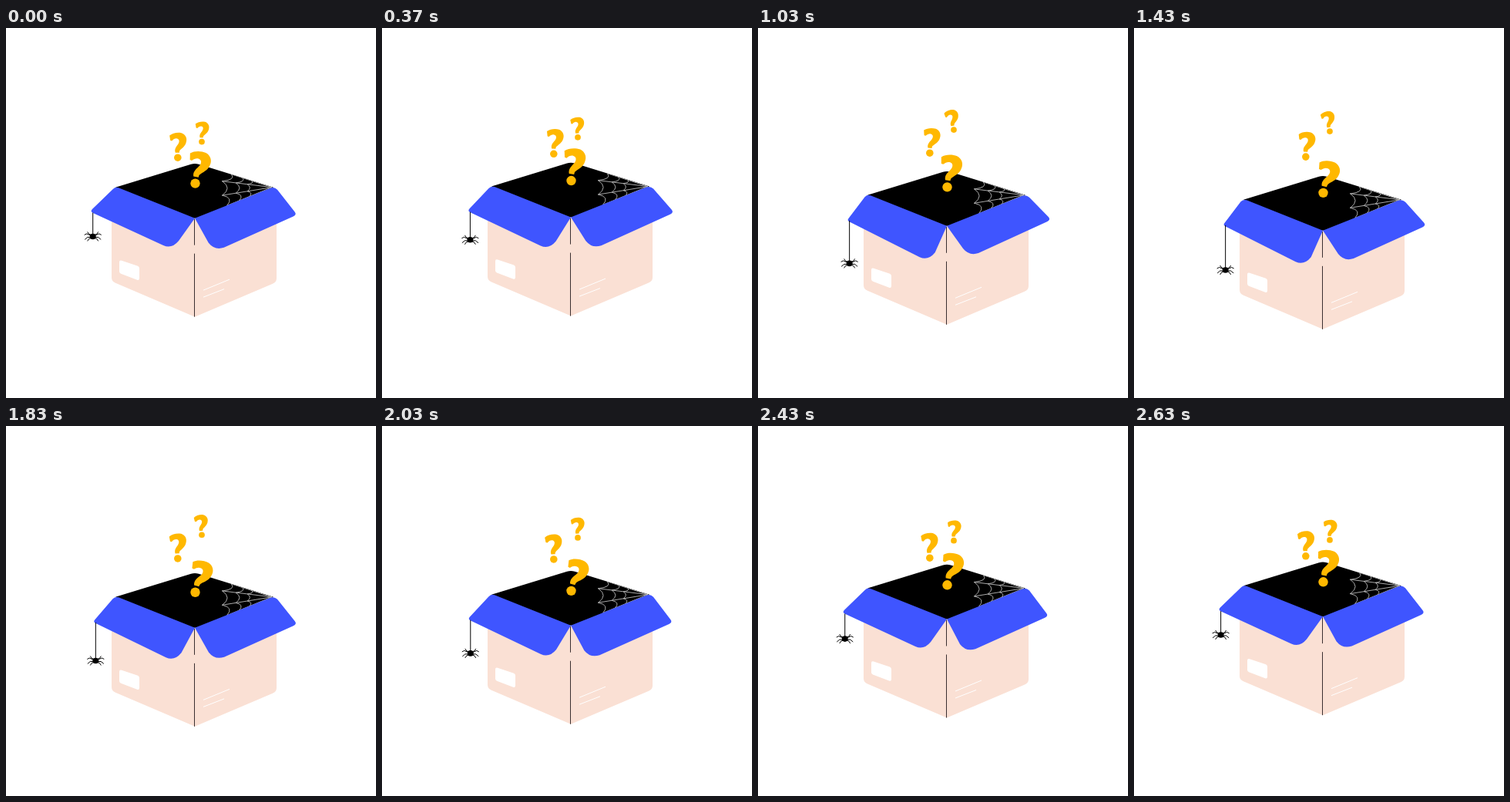
An HTML page with a canvas that plays this animation: 480x480 px, repeating every 2.67 s.

```html
<!DOCTYPE html>
<html lang="en">
<head>
<meta charset="utf-8">
<title>Empty box</title>
<style>
html, body { margin: 0; width: 100%; height: 100%; overflow: hidden; background: #fff; }
canvas { display: block; width: 100vmin; height: 100vmin; }
</style>
</head>
<body>
<canvas id="stage" width="480" height="480"></canvas>
<script>
const ctx = document.getElementById('stage').getContext('2d');
const LOOP = 2670;
const BLUE = '#3f55ff', SKIN = '#fae0d4', YELLOW = '#ffb800';

// Cosine swing that reaches +1 at the given time of the loop
const swing = (t, peak) => Math.cos((t - peak) / LOOP * 2 * Math.PI);

function fill(d, color) {
  ctx.fillStyle = color;
  ctx.fill(new Path2D(d));
}

function stroke(d, color, width = 1) {
  ctx.strokeStyle = color;
  ctx.lineWidth = width;
  ctx.stroke(new Path2D(d));
}

function dot(x, y, rx, ry, color) {
  ctx.fillStyle = color;
  ctx.beginPath();
  ctx.ellipse(x, y, rx, ry, 0, 0, 7);
  ctx.fill();
}

function cobweb() {
  const apex = [345, 207];
  const ends = [[292, 190], [280, 199], [280, 217.5], [286, 231]];
  const along = ([x, y], k) => [apex[0] + (x - apex[0]) * k, apex[1] + (y - apex[1]) * k];
  let d = '';
  for (const end of ends) d += `M${apex}L${end}`;
  for (const k of [0.99, 0.72, 0.49]) {
    for (let i = 0; i < 3; i++) {
      const a = along(ends[i], k), b = along(ends[i + 1], k);
      const bulge = along([(a[0] + b[0]) / 2, (a[1] + b[1]) / 2], 0.8);
      d += `M${a}Q${bulge} ${b}`;
    }
  }
  ctx.save();
  ctx.clip(new Path2D('M142 207L245 176L348 207L245 247Z'));
  stroke(d, '#bbb', 0.9);
  ctx.restore();
}

function box(l, r) {
  fill('M142 207L240 177Q245 175.500 250 177L347 207L245 248Z', '#000');
  cobweb();
  fill('M137 245V324Q137 329 142 331L245 375L346 332Q351 330 351 325V245L245 247Z', SKIN);
  stroke('M244.500 248V282M244.500 293V375', '#3a3030');
  fill('M147 304Q147 301 150 302L171 309Q173 310 173 312V325Q173 328 170 327L149 319Q147 318 147 316Z', '#fff');
  stroke('M256 340.500L290 326.500M256 349.500L283 339', '#fff');

  const lx = 114 + 3.2 * l, ly = 239 + 0.7 * l;
  const tx = 218 + 3 * l, ty = 290 + 2.7 * l;
  fill(`M245 247L146 207.500Q142 206 138.500 209.500L${lx + 1} ${ly - 3}
    Q${lx - 2} ${ly} ${lx + 2} ${ly + 2}L${tx - 11} ${ty - 5}Q${tx} ${ty} ${tx + 9} ${ty - 11}Z`, BLUE);

  const rx = 377.5 + 1.5 * r, ry = 239.5 - 2 * r;
  const bx = 272 + 2 * r, by = 288 - 1.8 * r;
  fill(`M245 247L343 208Q348 206 352 210L${rx - 2} ${ry - 2}
    Q${rx + 1} ${ry + 1.5} ${rx - 4} ${ry + 4}L${bx + 12} ${by - 4}Q${bx} ${by} ${bx - 8} ${by - 10}Z`, BLUE);
}

function spider(x, top, y) {
  stroke(`M${x} ${top}V${y}`, '#000');
  ctx.save();
  ctx.translate(x, y);
  dot(0, 0, 4, 3.8, '#000');
  for (const side of [1, -1]) {
    ctx.scale(side, 1);
    stroke('M2 -2L5 -3L7 -6M2 -1L8 -3.500L11 -2M2 1L7 1L10.500 4M2 2L5 3L7 6', '#000');
  }
  ctx.restore();
}

// Drawn around the centre of its dot
function questionMark(x, y, size, degrees) {
  ctx.save();
  ctx.translate(x, y);
  ctx.scale(size, size);
  dot(0, 0, 6.2, 6.2, YELLOW);
  ctx.rotate(degrees * Math.PI / 180);
  fill(`M-7.500 -39C-2 -42.500 7 -42.500 13 -40C19 -37 21.500 -30 18.500 -24
    C16 -17 9 -14.500 5.500 -11.500C4.500 -10.500 4.500 -9.500 4 -8L-2.500 -9
    C-3.500 -15 0 -18 4 -22C8 -26 8 -30.500 4 -32C1 -33 -2 -32 -5 -29.500L-7.500 -30.500Z`, YELLOW);
  ctx.restore();
}

function draw(now) {
  const t = now % LOOP;
  const lift = 7.3 + 9.1 * swing(t, 1580);
  const left = swing(t, 1230);

  ctx.fillStyle = '#fff';
  ctx.fillRect(0, 0, 480, 480);

  ctx.save();
  ctx.translate(0, lift);
  box(left, swing(t, 950));
  ctx.restore();

  spider(115.8 + 3.2 * left, 240 + lift, 292 + 22 * swing(t, 1420));

  questionMark(245.5, 207 + 9 * swing(t, 1730), 1, 2 + 4.5 * swing(t, 1930));
  questionMark(222.8, 167 + 6 * swing(t, 2090), 0.77, -7.5 + 4.3 * swing(t, 870));
  questionMark(254, 140.3 - 8.4 * swing(t, 1115), 0.62, -14 - 6 * swing(t, 1150));

  requestAnimationFrame(draw);
}
requestAnimationFrame(draw);
</script>
</body>
</html>
```
